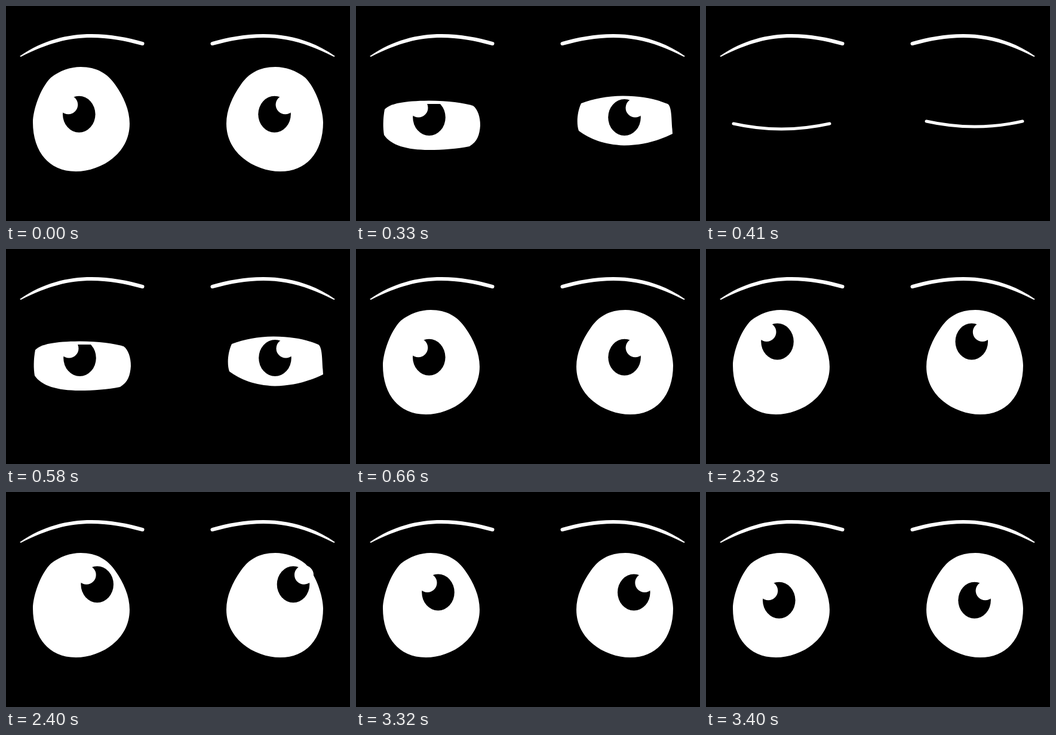
Recreate the animation shown at these times as an HTML page. Size 576 px wide and 360 px high, loop 5230 ms.

```html
<!DOCTYPE html>
<html lang="en">
<head>
<meta charset="utf-8">
<title>Blinking eyes</title>
<style>
  html, body { margin: 0; width: 100%; height: 100%; overflow: hidden; background: #000; }
  svg { display: block; width: 576px; height: 360px; fill: #fff; }
</style>
</head>
<body>
<svg viewBox="0 0 576 360">
  <defs>
    <path id="brow" d="M23 84C62 57 103 47 143 47C175 47 205 53 229 60A3 3 0 0 1 228 66C198 58 172 53 143 53C105 53 70 62 25 85Z"/>
    <path id="eye" d="M125 102C152 102 170 113 183 132C197 152 207 174 207 197C207 248 158 277 117 277C68 277 45 239 45 195C45 175 57 138 75 120C90 108 108 102 125 102Z"/>
    <path id="lid" d="M46 197Q126 215 207 197" fill="none" stroke="#fff" stroke-width="5" stroke-linecap="round"/>
    <g id="pupil"><ellipse rx="27.3" ry="30.5" fill="#000"/><circle cx="-18" cy="-16" r="16"/></g>
    <clipPath id="clipL"><path d="M0 164H288V360H0Z"/></clipPath>
    <clipPath id="clipR"><path d="M288 155.5H576V360H288Z"/></clipPath>
  </defs>

  <use href="#brow"/>
  <use href="#brow" transform="matrix(-1 0 0 1 574 0)"/>

  <g id="open">
    <use href="#eye"/>
    <use href="#eye" transform="matrix(-1 0 0 1 576 0)"/>
    <use href="#pupil" id="pupilL"/>
    <use href="#pupil" id="pupilR"/>
  </g>

  <g id="half">
    <path d="M48 173C58 163 80 159 122 158.5C155 159 180 162 196 167C204 173 208 186 208 200C207 216 203 227 190 235C170 239 145 241 122 241C85 241 58 233 47 216C45 205 45 188 48 173Z"/>
    <path d="M377 163C398 155 420 151 447 150.500C480 151 500 155 522 164C529 169 528 190 529.500 206L530 214C505 226 480 233 449 233.500C415 232 392 223 373 209C369 198 370 178 377 163Z"/>
    <g clip-path="url(#clipL)"><use href="#pupil" transform="translate(122.500 186.500)"/></g>
    <g clip-path="url(#clipR)"><use href="#pupil" transform="matrix(-1 0 0 1 449.500 186.500)"/></g>
  </g>

  <g id="closed">
    <use href="#lid"/>
    <use href="#lid" transform="matrix(-1 0 0 1 576 -4)"/>
  </g>
</svg>
<script>
const LOOP = 5230;
const el = id => document.getElementById(id);

// Gaze poses: left pupil x, right pupil x, shared y
const ahead = [122.3, 449.6, 181.3];
const upLeft = [100, 420.8, 156.3];
const up = [119.5, 444.8, 155];
const upRight = [152.7, 481, 154.7];
const between = (a, b) => a.map((v, i) => (v + b[i]) / 2);

// Start time, lid state, then gaze or offset of the half-open eyes
const poses = [
  [0, "open", ahead],
  [330, "half", [0, 0]],
  [410, "closed"],
  [580, "half", [1, -4]],
  [660, "open", ahead],
  [990, "open", between(ahead, upLeft)],
  [1070, "open", upLeft],
  [2320, "open", up],
  [2400, "open", upRight],
  [3320, "open", between(upRight, ahead)],
  [3400, "open", ahead]
];

function draw(now) {
  const time = now % LOOP;
  const [, state, place] = poses.findLast(([start]) => start <= time);
  for (const id of ["open", "half", "closed"]) {
    el(id).style.display = id === state ? "" : "none";
  }
  if (state === "open") {
    const [left, right, y] = place;
    el("pupilL").setAttribute("transform", `translate(${left} ${y})`);
    el("pupilR").setAttribute("transform", `matrix(-1 0 0 1 ${right} ${y})`);
  } else if (state === "half") {
    el("half").setAttribute("transform", `translate(${place})`);
  }
}

const start = performance.now();
function tick() {
  draw(performance.now() - start);
  requestAnimationFrame(tick);
}
tick();
</script>
</body>
</html>
```
